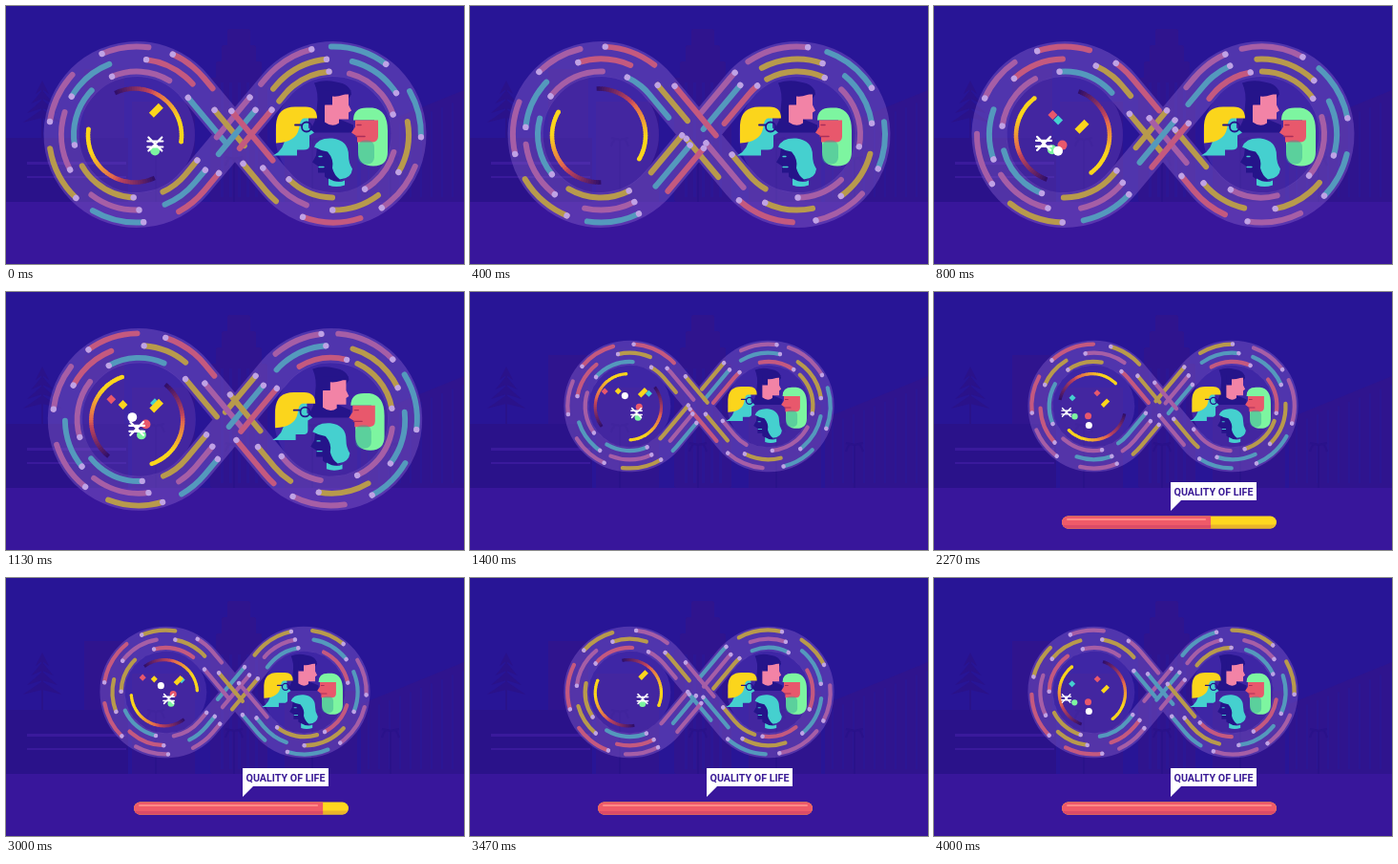
An HTML page with a canvas for the animation above (4.07 s loop, 480x270 px).

```html
<!DOCTYPE html>
<html lang="en">
<head>
<meta charset="utf-8">
<title>Quality of life</title>
<style>
  html, body { margin: 0; width: 100%; height: 100%; overflow: hidden; background: #38169b; }
  canvas { display: block; width: 480px; height: 270px; }
</style>
</head>
<body>
<canvas id="stage" width="480" height="270"></canvas>
<script>
const ctx = document.getElementById('stage').getContext('2d');
const LOOP = 4070, TAU = Math.PI * 2;
const RED = '#e8586c', YELLOW = '#fbd51c', TEAL = '#45d0cf', MINT = '#7df5a0', NAVY = '#25148a', WHITE = '#fff';

const clamp = v => Math.max(0, Math.min(1, v));
const mix = (a, b, p) => a + (b - a) * p;
const smooth = p => p * p * (3 - 2 * p);
const slowDown = p => Math.sin(p * Math.PI / 2);
const ease = (t, from, to) => smooth(clamp((t - from) / (to - from)));

function rect(color, x, y, w, h, r = 0) {
  ctx.fillStyle = color;
  ctx.beginPath();
  ctx.roundRect(x, y, w, h, r);
  ctx.fill();
}
function disc(color, x, y, r) {
  ctx.fillStyle = color;
  ctx.beginPath();
  ctx.arc(x, y, r, 0, TAU);
  ctx.fill();
}
function shape(color, d) {
  ctx.fillStyle = color;
  ctx.fill(new Path2D(d));
}
function line(color, width, path, dash = [], offset = 0) {
  ctx.strokeStyle = color;
  ctx.lineWidth = width;
  ctx.setLineDash(dash);
  ctx.lineDashOffset = offset;
  ctx.stroke(typeof path === 'string' ? new Path2D(path) : path);
}

// Dim city behind everything
function city() {
  const wall = '#2f148e', dark = '#2a128a', pale = '#2b1694';
  rect('#281596', 0, 0, 480, 205);
  rect('#38169b', 0, 205, 480, 65);
  for (let i = 0; i < 4; i++) rect(wall, 232 - i * 6, 24 + i * 17, 24 + i * 12, 181 - i * 17, 2);
  for (let x = 225; x < 266; x += 9) rect(pale, x, 80, 3, 120);
  rect(wall, 82, 66, 42, 139);
  rect(wall, 132, 100, 66, 105);
  rect(wall, 292, 118, 76, 87);
  rect(dark, 0, 138, 128, 67);
  rect('#3a1a9c', 22, 163, 104, 3);
  rect('#3a1a9c', 22, 178, 104, 2);
  shape(wall, 'M372 132L480 88V205H372Z');
  for (let x = 380; x < 480; x += 11) line(pale, 2, `M${x} ${140 - (x - 372) * .4}V200`);
  for (let i = 0; i < 4; i++) {
    const y = 86 + i * 10, w = 7 + i * 4.5;
    shape(dark, `M38 ${y - 8}L${38 + w} ${y + 6}L38 ${y + 1}L${38 - w} ${y + 6}Z`);
  }
  line(dark, 2, 'M38 80V138');
  for (let i = 0; i < 4; i++) {
    const x = 157 + i * 82, y = 140 + i % 2 * 20;
    line(dark, 2, `M${x} 205V${y}M${x - 9} ${y + 7}Q${x - 6} ${y - 4} ${x} ${y}Q${x + 6} ${y - 4} ${x + 9} ${y + 7}M${x - 9} ${y - 2}L${x} ${y}L${x + 9} ${y - 2}`);
  }
}

// Figure eight: two circles joined by straight tangents
const HALF = 103, RADIUS = 79;
const tilt = Math.acos(RADIUS / HALF);
const LENGTH = (TAU - 2 * tilt) * 2 * RADIUS + 4 * Math.sqrt(HALF ** 2 - RADIUS ** 2);
function eight(d) {
  const p = new Path2D();
  p.arc(-HALF, 0, RADIUS + d, tilt, TAU - tilt);
  p.arc(HALF, 0, RADIUS - d, Math.PI - tilt, Math.PI + tilt, true);
  p.closePath();
  return p;
}

let seed = 7;
const random = () => (seed = seed * 16807 % 2147483647) / 2147483647;
const INKS = ['#c4597f', '#b89a4c', '#5499bd', '#a65ea6'];
const COUNT = 12, STEP = LENGTH / COUNT, SPEED = .085;
const band = eight(0);
const lanes = [-13, 0, 13].map(d => ({
  path: eight(d),
  dashes: Array.from({ length: COUNT }, (_, k) => ({
    start: 61 + (k + random() * .15) * STEP,
    size: STEP * mix(.55, .78, random()),
    ink: INKS[Math.floor(random() * INKS.length)]
  }))
}));

function tracks(t) {
  for (const x of [-HALF, HALF]) disc('rgba(110,75,195,.32)', x, 0, 61);
  line('rgba(128,92,200,.45)', 37, band);
  ctx.lineCap = 'round';
  for (const { path, dashes } of lanes) {
    for (const { start, size, ink } of dashes) {
      const head = start - SPEED * t;
      line(ink, 6, path, [size, LENGTH - size], -head);
      line('#bfa2e6', 6.4, path, [.01, LENGTH - .01], -head);
    }
  }
  ctx.setLineDash([]);
}

// Turning pair of arcs, bright at the leading end
function spinner(t) {
  const turn = (8 + t * .056) * Math.PI / 180, span = 2.15, steps = 40;
  const cx = -HALF - 2, r = 49;
  ctx.lineCap = 'butt';
  ctx.lineWidth = 4.5;
  for (const head of [turn, turn + Math.PI]) {
    for (let i = 0; i < steps; i++) {
      const p = i / steps, a = head - span * (1 - p);
      const warm = clamp(p / .42), gold = clamp((p - .35) / .4);
      const mixed = (from, mid, to) => mix(mix(from, mid, warm), to, gold);
      ctx.strokeStyle = `rgb(${mixed(50, 222, 251)},${mixed(15, 80, 213)},${mixed(105, 88, 28)})`;
      ctx.beginPath();
      ctx.arc(cx, 1, r, a, a + span / steps + .015);
      ctx.stroke();
    }
    disc(YELLOW, cx + r * Math.cos(head), 1 + r * Math.sin(head), 2.25);
  }
  ctx.lineCap = 'round';
}

// Confetti: each piece glides between two points during its life
const CYCLE = 1735, BORN = 400;
const marks = {
  hash: () => line(WHITE, 2.2, 'M-8 -3H8M-8 3H8M-7 -7L7 7M7 -7L-7 7'),
  diamond: c => shape(c, 'M0 -5L5 0L0 5L-5 0Z'),
  pair: c => shape(c, 'M0 -5L5 0L0 5L-5 0ZM5 -10L10 -5L5 0L0 -5Z'),
  dot: c => disc(c, 0, 0, 5)
};
const bits = [
  { kind: 'dot', color: MINT, from: [-36, 15], to: [20, 17], life: 1500 },
  { kind: 'diamond', color: RED, from: [15, -19], to: [-38, -22], life: 1150 },
  { kind: 'diamond', color: TEAL, from: [-45, -11], to: [31, -19], life: 1200 },
  { kind: 'pair', color: YELLOW, from: [15, -2], to: [18, -24], life: 1550, move: smooth },
  { kind: 'diamond', color: YELLOW, from: [-17, -12], to: [-17, -25], life: 700, delay: 600 },
  { kind: 'dot', color: RED, from: [-9, 15], to: [16, 0], life: 1200, move: smooth },
  { kind: 'dot', color: WHITE, from: [-7, 30], to: [-7, -19], life: 1200, move: smooth },
  { kind: 'hash', color: WHITE, from: [-50, 9], to: [21, 10], life: 1550 }
];
function confetti(t) {
  for (const { kind, color, from, to, life, delay = 0, move = slowDown } of bits) {
    const p = (t + CYCLE - BORN - delay) % CYCLE / life;
    if (p >= 1) continue;
    const size = smooth(clamp(9 * Math.min(p, 1 - p))), m = move(p);
    ctx.save();
    ctx.translate(mix(from[0], to[0], m) - HALF, mix(from[1], to[1], m));
    ctx.scale(size, size);
    marks[kind](color);
    ctx.restore();
  }
}

function people() {
  ctx.save();
  ctx.translate(-240, -134);
  // long dark hair
  shape(NAVY, 'M323 80Q334 76 346 79Q361 81 362 92L345 116L364 124V132H316Q326 122 326 104Q328 91 323 80Z');
  shape('#f283a6', 'M337 92H359V103L362 109L359 111V118H349V122Q342 127 334 121V104Z');
  shape(NAVY, 'M334 88H362Q352 95 342 94V103H334Z');
  // glasses
  shape(TEAL, 'M300 116H317V127L323 132L318 135V146Q318 150 312 150H305V156H280Q292 150 293 135Z');
  shape(YELLOW, 'M283 143V124Q284 105 303 105H314Q326 105 326 117H312Q308 118 307 128Q304 142 283 143Z');
  line(NAVY, 1.8, 'M303 124H310M310 126a5 5 0 1 0 10 0a5 5 0 1 0 -10 0');
  // beard
  shape(MINT, 'M364 119Q364 106 378 106H384Q400 108 400 130V152Q400 167 385 167Q369 167 369 152V140H386V119Z');
  shape(RED, 'M366 119H390V136Q390 142 383 142H368V136L362 132L366 126Z');
  rect('rgba(50,165,150,.45)', 369, 140, 17, 25, 7);
  line('#a92e5a', 1.5, 'M367 136H376M368 124H372');
  // blue hair
  shape(NAVY, 'M326 147H342L348 172L354 180Q344 187 334 178V174H327V167L321 163L325 156Z');
  shape(TEAL, 'M323 147Q327 137 342 138Q359 140 359 156Q359 164 363 170Q362 180 350 181Q344 177 342 169Q344 160 337 152Q330 151 323 147Z');
  shape(TEAL, 'M338 180Q348 186 355 182V187Q346 190 338 187Z');
  line(TEAL, 1.3, 'M328 168H333M328 157H331');
  ctx.restore();
}

const TEXT = 'QUALITY OF LIFE', ROOM = 83;
function setFont(family, size) {
  ctx.font = `bold ${size}px "${family}", sans-serif`;
  return ctx.measureText(TEXT).width;
}
function label() {
  shape(WHITE, 'M248 199H338V218H259L248 229Z');
  ctx.fontStretch = 'extra-condensed';
  const [width, family] = ['Open Sans', 'Noto Sans', 'Roboto']
    .map(name => [setFont(name, 14), name])
    .sort((a, b) => a[0] - b[0])[0];
  setFont(family, Math.min(14, 14 * ROOM / width));
  ctx.fillStyle = '#3a1a96';
  ctx.textAlign = 'center';
  ctx.textBaseline = 'middle';
  ctx.fillText(TEXT, 293, 209.5);
}

function meter(t) {
  const open = ease(t, 1450, 1620), pop = ease(t, 1550, 1720);
  const fill = Math.min(225, 156 + (t - 2270) * .0576);
  if (!open) return;
  ctx.save();
  ctx.beginPath();
  ctx.roundRect(134 + 112.5 * (1 - open), 234.5, 225 * open, 13, 6.5);
  ctx.clip();
  rect('#ffd71f', 134, 234, 225, 14);
  rect('#e9b52a', 134, 243.5, 225, 5);
  rect('#ef5a69', 134, 234, fill, 14);
  rect('#dc4b68', 134, 244, fill, 4);
  rect('#ff8a86', 139, 237, fill - 10, 2, 1);
  ctx.restore();

  if (!pop) return;
  ctx.save();
  ctx.translate(248, 229);
  ctx.scale(pop, pop);
  ctx.translate(-248, -229);
  label();
  ctx.restore();
}

function draw(t) {
  city();
  const shrink = ease(t, 1080, 1390), scale = mix(1, .706, shrink);
  ctx.save();
  ctx.translate(240, mix(134.5, 119.5, shrink));
  ctx.scale(scale, scale);
  tracks(t);
  spinner(t);
  confetti(t);
  people();
  ctx.restore();
  meter(t);
}

const begin = performance.now();
function frame() {
  draw((performance.now() - begin) % LOOP);
  requestAnimationFrame(frame);
}
frame();
</script>
</body>
</html>
```
